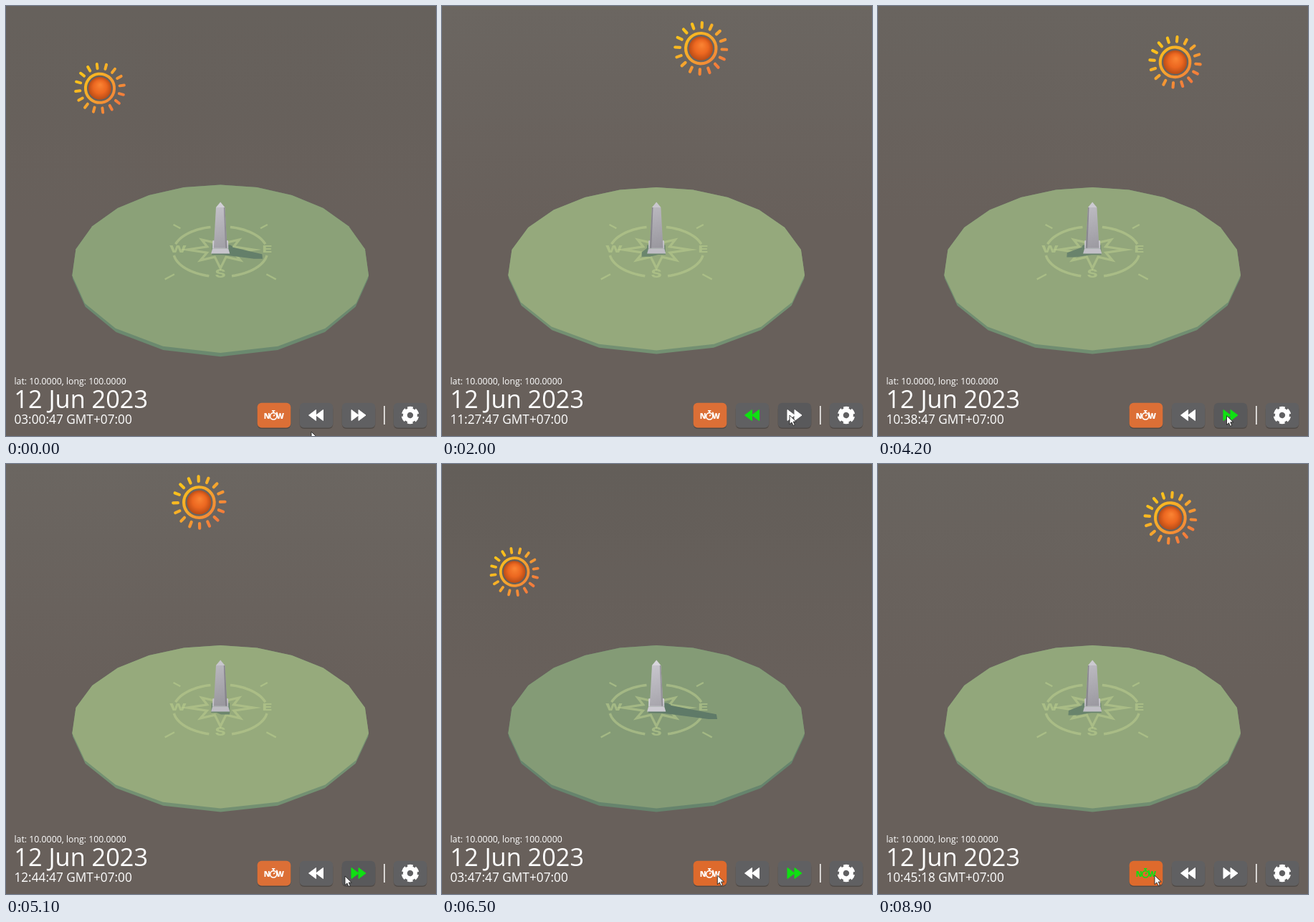
Animation of 600x600 px, one loop 9 s. Source, as an HTML page with a canvas:

```html
<!DOCTYPE html>
<html lang="en">
<head>
<meta charset="utf-8">
<title>Sun path</title>
<style>
  html, body { margin: 0; width: 100%; height: 100%; overflow: hidden; background: #69605b; }
  canvas, svg { position: absolute; left: 0; top: 0; width: 600px; height: 600px; }
  text { font-family: "Open Sans", sans-serif; fill: #fff; }
  .btn { fill: #606062; }
  .btn.hover { fill: #59595b; }
  .btn.down { fill: #4c4a4b; }
  #nowBtn { fill: #dc6f36; }
  #nowBtn.hover { fill: #de6a2c; }
  .icon { fill: #fff; stroke: #fff; }
  .icon text { fill: inherit; stroke: none; font-weight: 800; font-size: 10.6px; }
  .icon.on { fill: #0fe012; stroke: #0fe012; }
</style>
</head>
<body>
<canvas id="scene" width="600" height="600"></canvas>
<svg viewBox="0 0 600 600">
  <text x="11.5" y="528" font-size="12.3">lat: 10.0000, long: 100.0000</text>
  <text x="11.3" y="561" font-size="34.3">12 Jun 2023</text>
  <text id="clock" x="11.4" y="583" font-size="17.25"></text>

  <g fill="#000" opacity=".22">
    <rect x="350.7" y="557" width="46.6" height="33" rx="6"/>
    <rect x="409.7" y="557" width="46.6" height="33" rx="6"/>
    <rect x="468.7" y="557" width="46.6" height="33" rx="6"/>
    <rect x="540.7" y="557" width="46.6" height="33" rx="6"/>
  </g>
  <rect id="nowBtn" x="350.7" y="553.8" width="46.6" height="34.6" rx="6"/>
  <rect id="backBtn" class="btn" x="409.7" y="553.8" width="46.6" height="34.6" rx="6"/>
  <rect id="fwdBtn" class="btn" x="468.7" y="553.8" width="46.6" height="34.6" rx="6"/>
  <rect class="btn" x="540.7" y="553.8" width="46.6" height="34.6" rx="6"/>
  <rect x="527" y="558" width="1.8" height="26" fill="#e4e2e0"/>

  <g id="nowIcon" class="icon">
    <text x="359.8" y="576.3">N</text>
    <text x="377" y="576.3">W</text>
    <circle cx="373.2" cy="572.3" r="4.7" fill="none" stroke-width="1.7"/>
    <path d="M371 564.8h4.4M373.2 564.5v3M377.3 566.8l1.3 1.3M373.2 572.3l1.9-2.1" fill="none" stroke-width="1.6"/>
  </g>
  <path id="backIcon" class="icon" stroke-width="1" stroke-linejoin="round" d="M432.5 563.5v15l-10-7.5zM442.5 563.5v15l-10-7.5z"/>
  <path id="fwdIcon" class="icon" stroke-width="1" stroke-linejoin="round" d="M482 563.5v15l10-7.5zM492 563.5v15l10-7.5z"/>
  <g fill="none" stroke="#fff" transform="translate(564 571) rotate(-110)">
    <circle r="7.1" stroke-width="5.8"/>
    <circle r="10" stroke-width="4.4" stroke-dasharray="7 3.472"/>
  </g>
  <path id="cursor" d="M0 0v12.6l3-2.7 2 4.6 2.3-1-2-4.5h4z" fill="#fff" stroke="#222" stroke-width=".9"/>
</svg>
<script>
const LOOP = 9000, STEP = 100;
const REWIND = 200, FORWARD = 3400, NOW = 6600;
const $ = id => document.getElementById(id);
const ctx = $('scene').getContext('2d');
const rad = d => d * Math.PI / 180;

// Minutes of the day and pointer place along the loop
const minutes = [[0, 900], [200, 900], [900, 816], [2000, 687], [3300, 512], [5100, 764], [6500, 947], [6600, 960]];
const pointer = [[0, 426, 594], [200, 435, 572], [1200, 437, 571], [2000, 485, 571], [3200, 494, 570],
  [3700, 494, 570], [5100, 473, 575], [6100, 384, 574], [8900, 386, 574]];

function sample(keys, t, col = 1) {
  const i = keys.findIndex(k => k[0] > t);
  if (i < 0) return keys[keys.length - 1][col];
  const a = keys[i - 1], b = keys[i];
  return a[col] + (b[col] - a[col]) * (t - a[0]) / (b[0] - a[0]);
}

// Perspective view from the south; axes are east, north, up
const DIST = 3.61, FOCAL = 726, SIN = .533, COS = .846;
const depth = (n, u) => DIST + n * COS - u * SIN;
function project([e, n, u = 0]) {
  const k = FOCAL / depth(n, u);
  return [299.2 + e * k, 340 - (n * SIN + u * COS) * k];
}

function sunAt(min) {
  const h = rad((min - 740) / 4), lat = rad(10), dec = rad(23.1);
  return [
    -Math.cos(dec) * Math.sin(h),
    Math.cos(lat) * Math.sin(dec) - Math.sin(lat) * Math.cos(dec) * Math.cos(h),
    Math.sin(lat) * Math.sin(dec) + Math.cos(lat) * Math.cos(dec) * Math.cos(h)
  ];
}

const rgb = c => `rgb(${c.map(Math.round).join()})`;
const tint = (c, ...k) => rgb(c.map((v, i) => v * k[i]));
const polar = (r, deg) => [r * Math.cos(rad(deg)), r * Math.sin(rad(deg))];

function trace(pts, closed = true) {
  ctx.beginPath();
  pts.forEach(p => ctx.lineTo(...p));
  if (closed) ctx.closePath();
}
function fill(pts, color) {
  trace(pts);
  ctx.fillStyle = color;
  ctx.fill();
}

function hull(pts) {
  pts = [...pts].sort((a, b) => a[0] - b[0] || a[1] - b[1]);
  const half = list => {
    const out = [];
    for (const p of list) {
      while (out.length > 1) {
        const [a, b] = out.slice(-2);
        if ((b[0] - a[0]) * (p[1] - a[1]) - (b[1] - a[1]) * (p[0] - a[0]) > 0) break;
        out.pop();
      }
      out.push(p);
    }
    return out.slice(0, -1);
  };
  return [...half(pts), ...half(pts.reverse())];
}

const square = (r, u) => [[-r, -r, u], [r, -r, u], [r, r, u], [-r, r, u]];
const plinth = [square(.064, .008), square(.054, .042)];
const shaft = [square(.046, .042), square(.029, .345)];
const apex = [0, 0, .37];

function drawSky(up) {
  const g = ctx.createLinearGradient(0, 0, 0, 600), dim = (.97 - up) * 22;
  g.addColorStop(0, rgb([107 - dim, 102 - dim, 97 - dim]));
  g.addColorStop(.5, rgb([104, 96, 91]));
  g.addColorStop(1, rgb([104, 96, 91]));
  ctx.fillStyle = g;
  ctx.fillRect(0, 0, 600, 600);
}

function drawDisc(ground, stretch) {
  const ring = u => Array.from({ length: 20 }, (_, i) => {
    const [x, y] = project([...polar(1.003, i * 18), u]);
    return [x, 367 + (y - 367) * stretch];
  });
  const top = ring(0);
  fill(hull([...top, ...ring(-.026)]), tint(ground, .77, .85, .92));
  fill(top, rgb(ground));
}

function letter(ch, e, n, sy) {
  const [x, y] = project([e, n]);
  ctx.save();
  ctx.translate(x, y);
  ctx.scale(1, sy);
  ctx.fillText(ch, 0, 8.3);
  ctx.restore();
}

function drawCompass() {
  const line = (pts, closed) => {
    trace(pts.map(project), closed);
    ctx.stroke();
  };
  ctx.strokeStyle = ctx.fillStyle = 'rgba(188,206,143,.56)';
  ctx.lineWidth = 3.5;
  for (const a of [0, 90, 180, 270]) {
    const arc = [];
    for (let d = a + 13; d <= a + 77; d += 4) arc.push(polar(.325, d));
    line(arc, false);
  }
  ctx.lineWidth = 2.4;
  for (const a of [45, 135, 225, 315]) line([polar(.42, a), polar(.5, a)], false);
  ctx.lineWidth = 3.2;
  line(Array.from({ length: 16 }, (_, i) => polar(i % 2 ? .1 : i % 4 ? .19 : .23, i * 22.5)), true);
  ctx.font = '800 23px Inter, sans-serif';
  ctx.textAlign = 'center';
  letter('W', -.296, .01, .6);
  letter('E', .325, .01, .6);
  letter('S', 0, -.285, .72);
}

// The scene light stands a little further south than the sun sign
function drawShadow([e, n, u], ground) {
  const cast = p => project([p[0] - p[2] * e * .95 / u, p[1] - p[2] * n * .72 / u]);
  for (const part of [plinth.flat(), [...shaft.flat(), apex]]) fill(hull(part.map(cast)), tint(ground, .72, .79, .88));
}

function drawObelisk([e, n, u]) {
  const base = 164 + (.97 - u) * 45;
  const tone = v => rgb([base + v, base + v - 2, base + v + 5]);
  const face = (a, b, i, j) => [a[i], a[j], b[j], b[i]].map(project);
  fill(face(...plinth, 0, 1), tone(26));
  fill(plinth[1].map(project), tone(34));
  const g = ctx.createLinearGradient(290, 280, 309, 336);
  g.addColorStop(0, tone(22));
  g.addColorStop(1, tone(-12));
  fill(face(...shaft, 0, 1), g);
  // Thin edge on the side turned away from the sun
  const s = e < 0 ? 1 : -1;
  const low = project(shaft[0][e < 0 ? 1 : 0]), high = project(shaft[1][e < 0 ? 1 : 0]);
  fill([low, high, [high[0] - s * 1.5, high[1]], [low[0] - s * 2.5, low[1]]], tone(-30));
  fill([shaft[1][0], shaft[1][1], apex].map(project), tone(36));
}

function drawSun([e, n, u]) {
  const r = 1.333, pos = [e * r * .986, n * r, u * r];
  const [x, y] = project(pos);
  const size = 3.175 / depth(pos[1], pos[2]);
  ctx.save();
  ctx.translate(x, y);
  ctx.scale(size, size);
  ctx.rotate(rad((x - 299) * .042));
  const g = ctx.createLinearGradient(-26, -26, 26, 26);
  g.addColorStop(0, '#fcc419');
  g.addColorStop(.5, '#f5a52e');
  g.addColorStop(1, '#f3793c');
  ctx.strokeStyle = g;
  ctx.lineWidth = 4.2;
  ctx.lineCap = 'round';
  ctx.beginPath();
  for (let a = 0; a < 360; a += 22.5) {
    ctx.moveTo(...polar(29.5, a));
    ctx.lineTo(...polar(36.2, a));
  }
  ctx.stroke();
  ctx.beginPath();
  ctx.arc(0, 0, 21.3, 0, 7);
  ctx.stroke();
  const ball = ctx.createRadialGradient(1, -5, 1, 0, 0, 17);
  ball.addColorStop(0, '#f98232');
  ball.addColorStop(.55, '#ec6720');
  ball.addColorStop(1, '#b94c16');
  ctx.fillStyle = ball;
  ctx.beginPath();
  ctx.arc(0, 0, 16.8, 0, 7);
  ctx.fill();
  ctx.restore();
}

function drawControls(t, min) {
  const two = v => String(Math.floor(v)).padStart(2, '0');
  const sec = t < NOW ? 47 : 16 + Math.floor((t - 6500) / 1000);
  $('clock').textContent = `${two((Math.floor(min / 60) + 11) % 12 + 1)}:${two(min % 60)}:${two(sec)} GMT+07:00`;

  const px = sample(pointer, t), py = sample(pointer, t, 2);
  $('cursor').setAttribute('transform', `translate(${px} ${py})`);
  const over = (id, x) => $(id).classList.toggle('hover', px >= x && px < x + 46 && py < 588);
  over('nowBtn', 351);
  over('backBtn', 410);
  over('fwdBtn', 469);
  $('fwdBtn').classList.toggle('down', t >= 3200 && t < FORWARD);
  $('backIcon').classList.toggle('on', t >= REWIND && t < FORWARD);
  $('fwdIcon').classList.toggle('on', t >= FORWARD && t < NOW);
  $('nowIcon').classList.toggle('on', t >= NOW);
}

function draw(t) {
  const min = t < NOW ? Math.round(sample(minutes, t)) : 645;
  const sun = sunAt(min + (t < NOW ? .78 : .3));
  const k = (.97 - sun[2]) / .41;
  const ground = [150 - 21 * k, 170 - 18 * k, 124 - 7 * k];
  drawSky(sun[2]);
  drawDisc(ground, 1 + .03 * Math.max(0, 1 - t / 300));
  drawCompass();
  drawShadow(sun, ground);
  drawObelisk(sun);
  drawSun(sun);
  drawControls(t, min);
}

const start = performance.now();
let last = -1;
function tick() {
  const t = Math.floor(Math.max(0, performance.now() - start) % LOOP / STEP) * STEP;
  if (t !== last) draw(last = t);
  requestAnimationFrame(tick);
}
tick();
</script>
</body>
</html>
```
